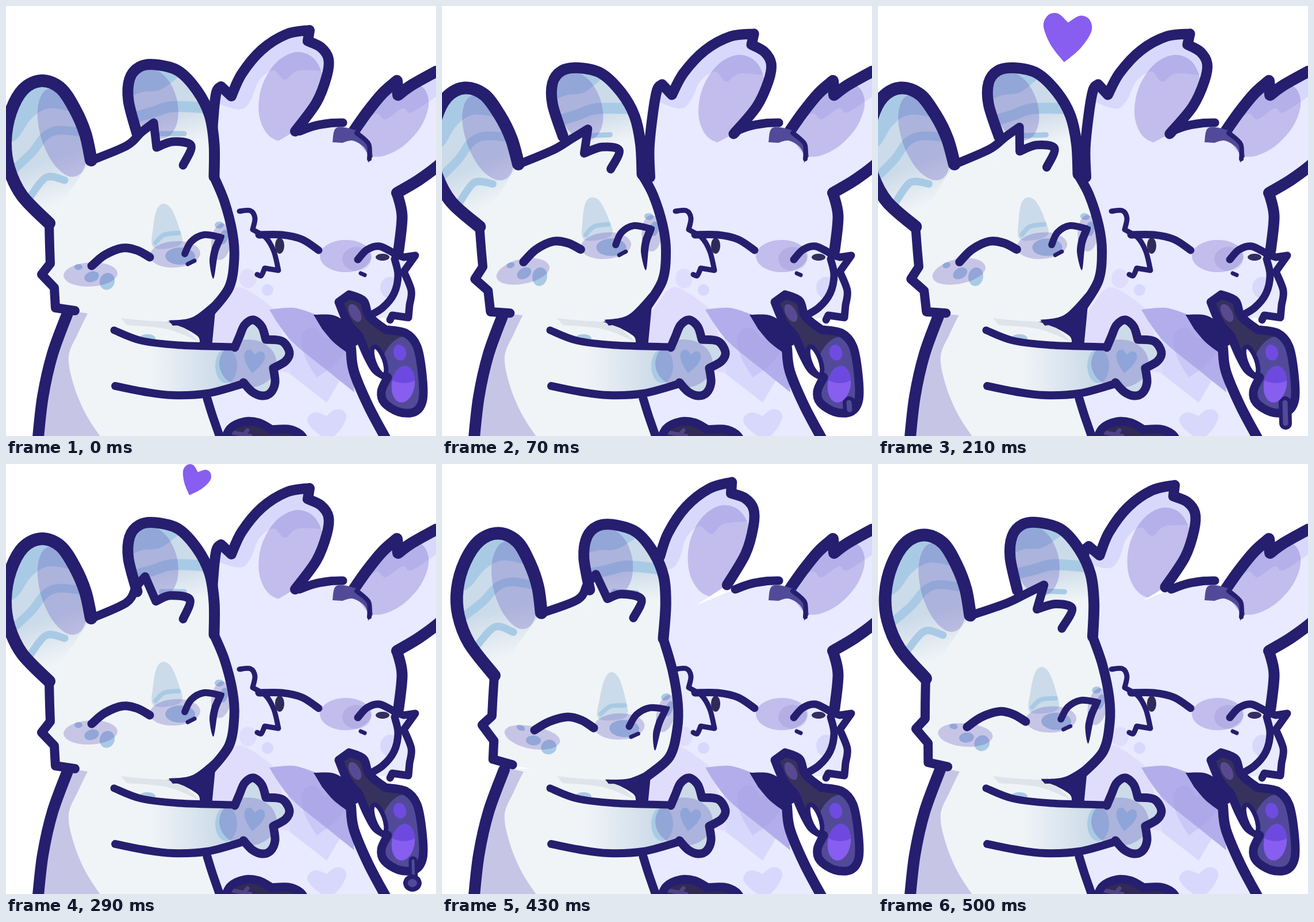
An HTML page with a canvas that plays this animation: 748 px wide and 748 px high, repeating every 570 ms.

```html
<!DOCTYPE html>
<html lang="en">
<head>
<meta charset="utf-8">
<title>Hug</title>
<style>
html, body { margin: 0; width: 100%; height: 100%; overflow: hidden; background: #fff; }
canvas { display: block; }
</style>
</head>
<body>
<canvas id="stage" width="748" height="748"></canvas>
<script>
const ctx = document.getElementById('stage').getContext('2d');
const INK = '#261e6e', SOFT = '#524a99', SHADE = 'rgba(83,64,182,.26)';
const SNOW = '#f0f4f7', PALE = '#ccdbe9', BLUE = '#a9cae4';
const LILAC = '#e9e9ff', TIP = '#d8d8fc', VIOLET = '#875eef';
const { PI, sin, cos, asin, exp, max, min, floor } = Math;

const still = (x, y) => [x, y];
const parse = s => s.trim().split(/\s+/).map(p => p.split(',').map(Number));

// Smooth curve through points: "/" makes a corner, "o" closes a loop.
function path(text, warp = still) {
  const out = new Path2D();
  const loop = text.includes('o');
  let last;
  for (const run of text.replace('o', '').split('/')) {
    const pts = parse(run).map(p => warp(...p));
    if (last) pts.unshift(last);
    else out.moveTo(...pts[0]);
    const n = pts.length;
    const at = i => loop ? pts[(i + n) % n] : pts[max(0, min(n - 1, i))];
    for (let i = 0; i < (loop ? n : n - 1); i++) {
      const [a, b, c, d] = [at(i - 1), at(i), at(i + 1), at(i + 2)];
      out.bezierCurveTo(b[0] + (c[0] - a[0]) / 6, b[1] + (c[1] - a[1]) / 6,
        c[0] - (d[0] - b[0]) / 6, c[1] - (d[1] - b[1]) / 6, c[0], c[1]);
    }
    last = pts[n - 1];
  }
  return out;
}

// Unit points turned, scaled and moved, as path text.
function place(pts, x, y, w, h, turn = 0) {
  const c = cos(turn), s = sin(turn);
  return pts.map(([u, v]) => `${x + u * w * c - v * h * s},${y + u * w * s + v * h * c}`).join(' ');
}

const ring = Array.from({ length: 10 }, (_, i) => [cos(i * PI / 5), sin(i * PI / 5)]);
const oval = (...spot) => place(ring, ...spot) + ' o';

function heart(x, y, w, h, turn, full = 1) {
  const half = [[0, 1], [-.62 * full, .35], [-1, -.4], [-.85, -.88], [-.45, -.98], [0, -.65 * full]];
  const other = half.slice(0, -1).map(([u, v]) => [-u, v]).reverse();
  return place(half, x, y, w, h, turn) + ' / ' + place(other, x, y, w, h, turn);
}

function fill(text, color, warp) {
  ctx.fillStyle = color;
  ctx.fill(path(text, warp));
}

function line(text, width, color = INK, warp) {
  ctx.strokeStyle = color;
  ctx.lineWidth = width;
  ctx.stroke(path(text, warp));
}

function within(area, draw) {
  ctx.save();
  ctx.clip(area);
  draw();
  ctx.restore();
}

// Dark lines that turn lighter inside the circles "x,y,r".
function inked(lines, glow, warp = still) {
  const all = color => lines.forEach(([text, width]) => line(text, width, color, warp));
  all(INK);
  const area = new Path2D();
  for (const [x, y, r] of parse(glow)) {
    const [cx, cy] = warp(x, y);
    area.moveTo(cx + r, cy);
    area.arc(cx, cy, r, 0, 2 * PI);
  }
  within(area, () => all(SOFT));
}

function fade(a, b, color, warp) {
  const g = ctx.createLinearGradient(...warp(...a), ...warp(...b));
  g.addColorStop(0, color);
  g.addColorStop(1, color + '00');
  return g;
}

// The head leans from the chin; the face slides up or down with it.
const headLean = k => (x, y) => {
  const face = exp(-(((x - 260) / 165) ** 4) - ((y - 420) / 110) ** 4);
  return [
    x + k * (.107 * (550 - y) + 5 * face),
    y + k * ((x - 330) / 13.5 + 33 * face) + k * k * .06 * max(0, 300 - y)
  ];
};

// The near ear is pushed away by the leaning head.
const earLean = k => (x, y) => {
  const up = max(0, 295 - y);
  return [x - k * up * .115, y - k * (x - 430) * .13 * min(1, up / 80)];
};

// The tuft swings on its own, loose at the tip.
const tuftSwing = (s, warp) => (x, y) => {
  const loose = max(0, min(1, (x - 200) / 40));
  return warp(x + s * loose * .4 * max(0, 250 - y), y + s * loose * 9);
};
const swings = [0, .8, 1.5, .4, -.8, -1, -1.1, .9];

const hearts = {
  2: heart(331, 100, 26, 35, .15, .35),
  3: heart(328, 56, 42, 42, .1),
  4: heart(328, 30, 25, 26, .35)
};

function purpleBody() {
  fill('358,280 / 500,222 / 590,205 / 680,325 690,370 684,425 / 713,437 / 696,462 / 706,500 / 700,540 / ' +
    '625,545 / 600,600 / 608,640 635,700 665,760 / 360,760 / 345,680 / 350,560', LILAC);
  fill('350,560 372,522 400,490 430,500 468,528 / 500,640 / 350,610', '#e0ddfc');
  fill('490,570 / 605,610 / 558,690 / 530,668 494,640', TIP);
  fill('458,528 500,525 540,537 / 598,598 / 606,672 / 560,635 500,586 470,548', '#b3adeb');
  fill(heart(549, 605, 40, 42, .2), 'rgba(158,152,226,.25)');
  fill(heart(560, 730, 34, 26, -.15), TIP);
  fill(oval(455, 494, 10, 10), TIP);
  fill(oval(421, 474, 15, 17), '#e0ddfc');
  fill(oval(668, 490, 17, 19), TIP);
  fill('535,537 570,538 600,555 / 618,585 / 592,602 / 570,585 550,562', INK);
  inked([['600,595 605,635 630,695 662,755', 18]], '606,636 14');
}

function purpleEars(warp) {
  const far = '602,222 628,185 655,152 680,130 / 682,155 / 705,138 748,114 / 800,130 785,225 / 765,265 722,300 680,325';
  const near = '362,298 358,250 361,190 366,150 374,140 / 392,157 / 410,118 445,76 488,49 528,42 / 525,61 ' +
    '/ 548,72 561,92 558,122 540,168 503,218';
  fill(far, LILAC);
  within(path(far), () => {
    fill('600,225 642,188 660,197 690,178 705,185 748,158 / 760,90 / 600,110', TIP);
    fill(oval(673, 198, 77, 46, -.82), SHADE);
  });
  fill(near, LILAC, warp);
  within(path(near, warp), () => {
    fill('355,165 405,180 425,165 440,130 465,112 485,128 510,112 575,115 / 580,20 / 390,20', TIP, warp);
    fill(oval(496, 158, 54, 80, .3), SHADE, warp);
  });
  inked([[near, 18]], '555,110 45 530,180 36 498,46 16', warp);
  inked([[far, 20]], '645,165 32 725,125 34');
  inked([['680,325 689,365 683,425', 19]], '690,420 8');
  inked([['510,218 535,209 562,204 586,203', 15]], '565,205 42');
  fill('568,237 575,212 610,217 632,237 638,262 / 630,273 / 628,255 620,243 602,234 585,238', SOFT);
  line('610,221 631,240 632,266', 8);
}

function purpleFace() {
  line('406,357 425,356 433,369 429,389 / 452,403 466,427 474,460 / 450,456 / 444,469 437,467', 9);
  fill(oval(476, 417, 8, 14), '#302a58');
  inked([['440,398 480,398 515,406 544,425', 13]], '493,400 9 515,407 9');
  fill(oval(591, 435, 45, 28), SHADE);
  fill(oval(610, 440, 25, 21), 'rgba(83,64,182,.12)');
  inked([['612,441 628,424 650,418 680,433', 13]], '632,425 20');
  fill(oval(655, 437, 12, 6), '#332d60');
  line('617,465 624,468', 7);
  inked([['676,432 692,437 / 712,434 / 692,462 / 705,495 702,520 / 700,542 / 672,538 / 668,546', 13],
    ['676,440 682,468 675,500 655,525 628,541', 13]], '700,488 24 712,432 8 680,540 12');
}

function drip(step) {
  if (step < 1 || step > 5) return;
  const y = step < 4 ? 690 + 12 * step : 685 + 11 * step;
  if (step < 5) {
    line(`708,690 709,${y}`, step < 4 ? 22 : 15);
    line(`708,690 709,${y}`, step < 4 ? 9 : 5, SOFT);
  }
  if (step > 3) {
    fill(oval(707, y, 16, 15), INK);
    fill(oval(707, y, 8, 7), SOFT);
  }
}

function goo(step) {
  const blob = '579,515 / 597,502 / 622,513 632,540 660,563 / 695,569 715,592 724,640 725,685 711,706 683,706 658,690 ' +
    '653,670 664,646 / 643,633 628,607 614,574 / 594,550 579,515';
  const hole = oval(649, 617, 9, 26, -.35);
  fill(blob, '#36315d');
  within(path(blob), () => fill(oval(695, 650, 46, 75), SOFT));
  line(blob, 15);
  drip(step);
  fill(hole, '#fff');
  line(hole, 8);
  fill(oval(607, 534, 9, 17, -.5), '#584a92');
  fill(oval(685, 603, 11, 14, -.25), '#6f4be2');
  const gem = oval(691, 658, 20, 32, .15);
  fill(gem, VIOLET);
  within(path(gem), () => fill(oval(692, 636, 30, 20), '#6d49df'));
}

function snowBody() {
  fill('108,530 78,610 60,690 52,760 / 372,760 / 345,685 / 342,590 / 345,530', SNOW);
  fill('108,528 78,610 60,690 52,760 / 172,760 / 140,712 118,660 109,610 125,570 142,535', SHADE);
  fill('200,543 240,547 300,550 / 336,584 / 280,562 210,555', '#dfe4ea');
  fill(oval(246, 578, 14, 7), BLUE);
  fill('280,549 / 330,518 368,490 / 358,595 / 337,590 / 334,575 310,560', INK);
  inked([['108,532 81,605 64,680 55,760', 20], ['350,683 359,712 374,755', 15]], '78,612 26 356,705 14');
}

function arm() {
  const tone = ctx.createLinearGradient(250, 0, 372, 0);
  tone.addColorStop(0, SNOW);
  tone.addColorStop(1, PALE);
  fill('190,563 240,583 330,592 400,593 / 415,657 / 350,675 270,675 190,661', tone);
  const paw = '398,594 406,575 415,555 430,546 445,558 452,580 / 480,583 493,602 486,618 465,630 / ' +
    '468,655 460,673 445,678 428,671 413,655';
  fill(paw, PALE);
  fill(oval(383, 626, 19, 30), BLUE);
  fill(oval(421, 622, 50, 42), SHADE);
  fill(heart(431, 619, 18, 20, .15), '#8fa5d9');
  inked([['188,564 235,582 300,590 396,593', 13], ['190,661 240,671 290,677 350,674 413,657', 14], [paw, 15]],
    '220,575 45 265,587 22 205,665 32 380,668 30 398,590 14 428,668 14 478,583 10');
}

function snowHead(warp, swing) {
  const earL = '75,378 28,330 5,282 -1,235 8,185 30,145 62,130 95,143 120,180 138,222 148,268';
  const earR = '228,222 213,165 215,127 232,106 260,102 300,113 333,148 354,190 362,240 362,297';
  const side = '362,297 380,340 394,395 397,440 388,490 355,533';
  const jaw = '75,378 76,420 77,448 / 62,467 / 84,490 / 86,525 / 120,530';
  const tuft = '150,268 210,243 235,220 257,203 / 262,246 / 290,236 322,243 308,277';
  const put = (text, color) => fill(text, color, warp);

  put('75,378 / 148,268 / 225,240 / 340,235 / ' + side + ' 325,547 287,550 / 122,532 / 86,500 / 76,445', SNOW);
  put(jaw, SNOW);
  put(earL, SNOW);
  put(earR, SNOW);
  within(path(earL, warp), () => {
    put(earL, fade([65, 270], [92, 345], PALE, warp));
    put('5,240 22,228 45,195 75,178 120,185 / 100,120 / 20,120', BLUE);
    line('12,286 45,255 68,226 95,216 145,222', 15, BLUE, warp);
    line('42,332 70,298 102,303', 13, BLUE, warp);
    put(oval(98, 220, 38, 80, -.3), SHADE);
  });
  within(path(earR, warp), () => {
    put(earR, fade([300, 180], [312, 240], PALE, warp));
    put('205,165 235,150 270,145 310,115 / 270,85 / 205,100', BLUE);
    line('215,196 255,185 290,175 360,178', 19, BLUE, warp);
    line('270,222 310,222', 9, BLUE, warp);
    put(oval(260, 170, 38, 62, -.25), SHADE);
  });
  fill(tuft, SNOW, tuftSwing(swing, warp));

  put('255,418 256,385 262,355 273,344 287,352 300,382 306,412 280,422 o', PALE);
  line('260,412 275,398 300,395', 8, BLUE, warp);
  put(oval(303, 435, 26, 15), BLUE);
  put(oval(294, 432, 44, 23, -.06), SHADE);
  put(oval(176, 479, 13, 15, .3), BLUE);
  put(oval(149, 471, 13, 9, -.3), BLUE);
  put(oval(126, 454, 7, 5), BLUE);
  put(oval(147, 467, 47, 21, -.05), SHADE);
  within(path(side + ' / 300,540 / 300,300', warp), () => {
    put(oval(371, 381, 8, 6), BLUE);
    put(oval(379, 402, 7, 13, .2), BLUE);
    put(oval(374, 410, 17, 32, .1), SHADE);
  });

  inked([[earR, 19], [earL, 22], [side, 17], [jaw, 16]],
    '125,180 50 135,240 30 25,150 16 322,125 42 350,170 24 222,115 13 382,365 17 82,490 11 122,530 16', warp);
  inked([[tuft, 15]], '160,266 8', tuftSwing(swing, warp));
  put('283,547 325,541 365,510 / 388,495 / 365,533 335,552 290,556', INK);
  inked([['149,452 172,433 203,421 228,425 250,437', 15], ['311,431 322,410 344,398 372,402', 12]],
    '182,427 9 328,405 28', warp);
  put('367,400 380,400 369,430 361,474 354,445 358,420', INK);
  line('316,449 328,443', 7, INK, warp);
}

function pot() {
  const rim = '376,765 390,735 415,723 440,725 462,737 / 490,736 512,745 525,765';
  fill(rim, '#302a55');
  line('395,742 425,748', 7, '#514384');
  line('420,738 408,752', 7, '#514384');
  inked([[rim, 15]], '428,725 26 482,738 18');
}

function draw(step) {
  const wave = asin(sin(step * PI / 4)) * 2 / PI;
  const lean = -wave * (wave > 0 ? 1 : .82);
  ctx.fillStyle = '#fff';
  ctx.fillRect(0, 0, 748, 748);
  ctx.lineCap = ctx.lineJoin = 'round';
  purpleBody();
  purpleEars(earLean(lean));
  purpleFace();
  goo(step);
  snowBody();
  pot();
  snowHead(headLean(lean), swings[step]);
  arm();
  if (hearts[step]) fill(hearts[step], VIOLET);
}

// Eight steps of 70 ms; the fourth holds 10 ms longer.
const stepAt = t => t < 290 ? min(3, floor(t / 70)) : 4 + floor((t - 290) / 70);

let shown;
function tick() {
  const step = stepAt(performance.now() % 570);
  if (step !== shown) draw(shown = step);
  requestAnimationFrame(tick);
}
tick();
</script>
</body>
</html>
```
